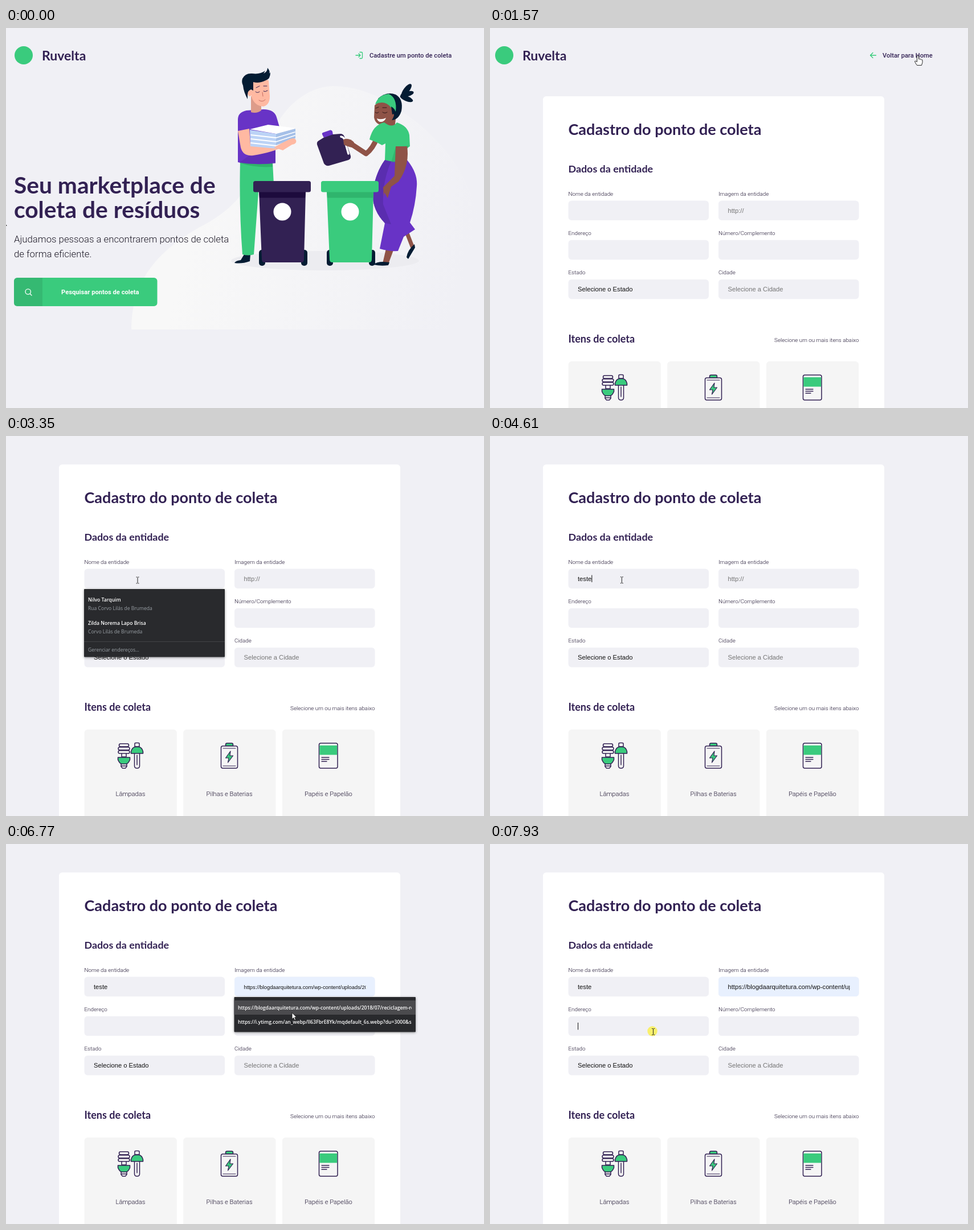
Write an HTML page that moves like this. It is 839x668 px and loops after 8 s.

```html
<!DOCTYPE html>
<html lang="pt-BR">
<head>
<meta charset="utf-8">
<title>Ruvelta</title>
<style>
html, body { margin: 0; width: 100%; height: 100%; overflow: hidden; background: #f0f0f5; }
svg { display: block; }
text { font-family: Roboto, sans-serif; fill: #322153; white-space: pre; }
.h { font-family: Lato, sans-serif; font-weight: 700; }
.nav { font-size: 11.2px; font-weight: 500; }
.lead { font-size: 16.75px; font-weight: 300; fill: #1c1826; }
.label { font-size: 9.8px; font-weight: 300; fill: #1c1230; }
.item { font-size: 11.2px; font-weight: 300; text-anchor: middle; fill: #1c1230; }
.in { font: 11.2px "Liberation Sans", sans-serif; fill: #111; }
.hint { fill: #757575; }
.menu text { font: 600 8.6px "Open Sans", sans-serif; fill: #fff; }
.menu .sub { font-weight: 400; fill: #9aa0a6; }
.menu > rect:first-child { fill: #292a2d; filter: drop-shadow(0 1px 2px #0006); }
.line { fill: none; stroke: #34cb79; stroke-width: 1.3; stroke-linecap: round; stroke-linejoin: round; }
.icon { stroke: #322153; stroke-width: 1.5; stroke-linejoin: round; stroke-linecap: round; fill: #f5f5f5; }
.icon .g, .g { fill: #3acb7d; }
.p { fill: #6833c6; } .d { fill: #322153; } .n { fill: #041c33; }
.skin { fill: #ffb9a2; } .brown { fill: #8f5347; }
.limb { fill: none; stroke-linecap: round; stroke-linejoin: round; }
</style>
</head>
<body>
<svg id="stage" width="839" height="668" viewBox="0 0 839 668">
<defs>
  <linearGradient id="haze" gradientUnits="userSpaceOnUse" x1="330" y1="330" x2="800" y2="450">
    <stop stop-color="#f8f8f8"/><stop offset="1" stop-color="#f0f0f5"/>
  </linearGradient>
  <g id="brand">
    <circle class="g" cx="31" cy="48" r="16"/>
    <text class="h" x="63" y="56.500" font-size="23">Ruvelta</text>
  </g>
  <g id="bin">
    <rect class="n" x="10" y="121" width="11" height="28" rx="5"/>
    <rect class="n" x="84" y="121" width="11" height="28" rx="5"/>
    <path d="M10 18H92L89 138Q89 143 84 143H20Q15 143 15 138Z" fill="currentColor"/>
    <path d="M10 18H92L91 29.500H11Z" fill="var(--shade)"/>
    <rect width="101" height="19.500" rx="3.500" fill="currentColor"/>
    <circle cx="51" cy="54" r="15.500" fill="#fff"/>
  </g>
</defs>

<g id="home">
  <path fill="url(#haze)" d="M220 530C220 450 260 395 340 350C440 300 440 230 475 170C500 125 540 102 575 102C640 104 680 135 720 165C790 220 839 300 839 420V530Z"/>
  <use href="#brand"/>
  <path class="line" d="M614 48H622M619 45L622 48L619 51M621 42.500H624Q625.500 42.500 625.500 44V52Q625.500 53.500 624 53.500H621"/>
  <text class="nav" x="638" y="52">Cadastre um ponto de coleta</text>
  <g font-size="40.7"><text class="h" x="14" y="290.500">Seu marketplace de</text><text class="h" x="14" y="334">coleta de resíduos</text></g>
  <text class="lead" x="14" y="376.500">Ajudamos pessoas a encontrarem pontos de coleta</text>
  <text class="lead" x="14" y="402.500">de forma eficiente.</text>
  <rect class="g" x="14" y="439" width="251.500" height="50" rx="5.600"/>
  <path d="M64 439H19.600Q14 439 14 444.600V483.400Q14 489 19.600 489H64Z" fill="#000" fill-opacity=".09"/>
  <path class="line" style="stroke:#fff" d="M34 463.500a4.700 4.700 0 1 0 9.400 0a4.700 4.700 0 1 0-9.400 0M42 467L45 470"/>
  <text x="97" y="467.500" font-size="11.2" font-weight="700" style="fill:#fff">Pesquisar pontos de coleta</text>

  <ellipse cx="560" cy="409" rx="165" ry="17" fill="#ececf0"/>
  <g id="man">
    <path class="n" d="M418 398H429L428 410Q414 415 401 413Q403 409 412 408Z"/>
    <path class="g" d="M411 236H468L470 275H444L435 398Q425 401 415 398Q409 320 411 236Z"/>
    <path fill="#2fb36b" d="M412 238H468V244Q440 246 412 238Z"/>
    <path class="p" d="M407 161Q407 148 422 145L452 143Q471 143 475 157L480 174L473 177V237Q440 242 407 236Z"/>
    <path fill="#5a2cac" d="M430 222L473 214V238Q440 241 409 237Z" opacity=".6"/>
    <path fill="#dd9c8a" d="M430 120H448V145Q440 151 430 148Z"/>
    <path class="skin" d="M430 96Q446 86 461 92L463 120Q463 135 452 138Q436 137 431 121Z"/>
    <ellipse class="skin" cx="428" cy="114" rx="4" ry="6"/>
    <path class="n" d="M424 125Q417 112 416 101Q413 95 415 89Q420 79 432 80Q446 82 455 75L452 80Q459 77 459 70Q464 76 462 80L464 78Q464 90 456 92Q444 98 434 95L434 110L430 108Q424 110 424 118Z"/>
    <path class="limb" stroke="#322153" d="M438 112Q441 115 445 112M452 111Q455 113 459 110M439 105L445 102M452 102L458 102"/>
    <path class="limb" stroke="#c56d60" d="M444 127Q450 131 455 126M450 113L451 120"/>
    <path class="skin" d="M407 181L427 177L429 205L478 202L488 208Q470 218 434 224Q416 226 412 210Z"/>
    <path fill="#bcd3f6" d="M428 179L474 186V212L429 208Z"/>
    <path fill="#a5c0e8" d="M474 186L508 177V198L474 212Z"/>
    <path fill="#fff" d="M428 178L460 170L508 176L474 186Z"/>
    <path class="limb" stroke="#fff" stroke-width="1.800" d="M430 188L474 193L507 183M430 195L474 200L507 189M430 202L474 207L507 195"/>
    <path class="skin" d="M470 210Q486 201 495 197Q506 191 509 197Q511 204 502 205L486 215Z"/>
  </g>
  <use href="#bin" x="434" y="269" style="color:#322153;--shade:#1d0b3d"/>
  <g id="woman">
    <path class="limb" stroke="#8f5347" stroke-width="7" d="M701 353L713 384"/>
    <path class="n" d="M717 380L718 386L706 406L703 403Q705 390 717 380Z"/>
    <path class="brown" d="M667 388H681L671 415L661 414Z"/>
    <path class="n" d="M645 416Q650 411 662 411L673 412L671 417Q658 419 645 416Z"/>
    <path class="p" d="M665 232H704Q723 255 721 278Q719 312 709 342L718 354L698 367L688 392Q672 393 656 388L665 343Q641 318 644 286Q649 254 665 232Z"/>
    <path fill="#5a2daf" d="M665 232H677Q660 270 662 310L676 345L665 343Q641 318 644 286Q649 254 665 232Z"/>
    <path class="brown" d="M671 160H684L682 178L668 172Z"/>
    <path class="n" d="M653 124Q668 111 684 117Q698 125 694 146Q689 162 676 162Z"/>
    <g class="n">
      <ellipse cx="703" cy="109" rx="5" ry="13" transform="rotate(38 703 109)"/>
      <ellipse cx="704" cy="116" rx="4.500" ry="12" transform="rotate(75 704 116)"/>
      <ellipse cx="703" cy="124" rx="4.500" ry="12" transform="rotate(112 703 124)"/>
    </g>
    <path class="brown" d="M647 136Q662 120 680 133L681 154Q675 171 662 171Q648 170 646 157Z"/>
    <path class="g" d="M648 134Q654 117 672 116Q687 123 684 147L676 140Q665 126 648 134Z"/>
    <path class="n" d="M676 138Q684 142 684 150L678 152Z"/>
    <path class="limb" stroke="#2c1717" d="M648 148Q651 151 654 148M661 148Q665 151 669 148M649 141L654 139M661 140L668 140"/>
    <path fill="#fff" d="M651 159Q659 162 667 158Q664 166 656 165Q652 163 651 159Z"/>
    <path class="limb" stroke="#8f5347" stroke-width="9" d="M651 193Q644 212 632 221L606 204"/>
    <path class="g" d="M664 166Q678 177 686 166Q705 172 708 188L709 208L704 211V232Q684 238 665 232L666 203L660 206Q650 200 638 196Q644 170 664 166Z"/>
    <path fill="#2aa661" d="M684 209L706 207V210L689 236H676Z" opacity=".5"/>
    <path class="brown" d="M684 208L704 208Q709 242 689 270L676 279L670 299L664 289L663 297L662 280L682 260Z"/>
  </g>
  <path class="p" d="M556 184L569 179.500Q572 179 573 182L574 188L558 193L555 187Q554 185 556 184Z"/>
  <path class="d" d="M557 193L574 187L587 186Q592 186 594 191L605 225Q606 230 601 232L567 242Q561 243 558 238L546 205Q545 200 549 198Z"/>
  <path class="limb" stroke="#fff" stroke-width="3.500" d="M588 191Q593 192 594 196L601 221"/>
  <path class="brown" d="M592 196Q602 192 611 201L607 210Q598 208 593 205Z"/>
  <use href="#bin" x="553" y="269" style="color:#3acb7d;--shade:#2fb56d"/>
</g>

<g id="form">
  <use href="#brand" x="-6"/>
  <path class="line" d="M677.500 48H667.500M672 43.500L667.500 48L672 52.500"/>
  <text class="nav" x="689" y="52">Voltar para Home</text>
  <rect x="93" y="120" width="599" height="900" rx="5.600" fill="#fff"/>
  <text class="h" x="137.500" y="188" font-size="27">Cadastro do ponto de coleta</text>
  <text class="h" x="137.500" y="253.500" font-size="17.9">Dados da entidade</text>
  <g id="fields"></g>
  <text class="h" x="137.500" y="553" font-size="18">Itens de coleta</text>
  <text class="label" x="647.500" y="551.500" text-anchor="end">Selecione um ou mais itens abaixo</text>
  <g id="items"></g>
  <g class="icon">
    <path d="M203 627V634H211V627"/>
    <rect x="198.500" y="611" width="17" height="5" rx="2.500"/><rect x="197" y="617" width="20" height="5" rx="2.500"/><rect x="197" y="623" width="20" height="5" rx="2.500"/>
    <path d="M202 645V651L204.500 654H209.500L212 651V645M203 650H211"/>
    <path class="g" d="M196.500 635H217.500V639Q215 645.500 211 646.500H203Q199 645.500 196.500 639Z"/>
    <path d="M225.500 627V650Q225.500 654 230 654Q234.500 654 234.500 650V627M230 631V648M226 616V611Q226 609.500 228 609.500H232Q234 609.500 234 611V616Z"/>
    <path class="g" d="M219.500 628V625Q221 617.500 227 616.500H233Q239 617.500 240.500 625V628Z"/>
    <path class="g" d="M385.500 615V612.500Q385.500 610 388 610H396Q398.500 610 398.500 612.500V615Z"/>
    <rect x="377.500" y="615" width="29" height="39" rx="3"/><path d="M381 619H403M381 650H403" stroke-width="1"/>
    <path class="g" d="M394 624L385.500 636H391L389.500 644L398.500 632H393Z" stroke-width="1.200"/>
    <rect x="549.500" y="610" width="32.500" height="44" rx="3"/>
    <path class="g" d="M550.300 614H581.200V630.500H550.300Z" stroke="none"/>
    <path d="M554 635H567M554 638.500H567M554 642H563" stroke-width="1.300"/>
  </g>
</g>

<g id="entry">
  <rect id="filled" x="401" y="233.500" width="246.500" height="34.500" rx="5.600" fill="#e8f0fe"/>
  <text id="typed" class="in" x="154" y="254.500"></text>
  <svg x="410" y="234" width="221.500" height="34"><text id="address" class="in" x="7.500" y="20.500">https://blogdaarquitetura.com/wp-content/uploads/2018/07/reciclagem-re</text></svg>
  <rect id="caret" width="1" height="12.500" fill="#111"/>
</g>

<g id="people" class="menu">
  <rect x="137" y="269" width="247" height="119.500" rx="1"/>
  <path d="M137 361.500H384" stroke="#434447"/>
  <text x="144" y="290.500">Nilvo Tarquim</text>
  <text class="sub" x="144" y="305.500">Rua Corvo Lilás de Brumeda</text>
  <text x="144" y="331.500">Zilda Norema Lapo Brisa</text>
  <text class="sub" x="144" y="346.500">Corvo Lilás de Brumeda</text>
  <text class="sub" x="144" y="379">Gerenciar endereços…</text>
</g>
<g id="links" class="menu">
  <rect x="400.500" y="269" width="318.500" height="61.500" rx="1"/>
  <rect id="hover" x="400.500" width="318.500" height="25" fill="#4b4b4e"/>
  <svg x="400" y="269" width="312" height="62">
    <text id="video" x="7">https://i.ytimg.com/an_webp/ll63FbrE8Yk/mqdefault_6s.webp?du=3000&amp;sq</text>
    <text id="blog" x="7">https://blogdaarquitetura.com/wp-content/uploads/2018/07/reciclagem-re</text>
  </svg>
</g>

<g id="cursor">
  <circle id="press" cx="-1.500" cy="-1" r="8.700" fill="#fbf04a" fill-opacity=".8"/>
  <path id="arrow" d="M0 0V11.500L2.700 9L4.600 13.200L6.600 12.300L4.700 8.300H8.200Z" fill="#fff" stroke="#111" stroke-width=".9"/>
  <path id="hand" d="M-1.500 1Q0-1 1.500 1V6Q3 4.800 4 6.500Q5.500 5.500 6.500 7.200Q8 6.500 8 8.500V12L6.500 17H-1.500Q-4.500 13-5.500 10Q-4.500 8-1.500 11Z" fill="#fff" stroke="#111" stroke-width=".9"/>
  <path id="beam" d="M-2.500-5.500H-.6M.6-5.500H2.500M0-5V5M-2.500 5.500H-.6M.6 5.500H2.500" fill="none" stroke="#222"/>
</g>
</svg>

<script>
const LOOP = 8000;
const $ = id => document.getElementById(id);
const show = (id, on) => $(id).style.display = on ? '' : 'none';
const within = (t, ...spans) => spans.some(([from, to]) => t >= from && t < to);

const fields = [
  ['Nome da entidade'], ['Imagem da entidade', 'http://', 'hint'],
  ['Endereço'], ['Número/Complemento'],
  ['Estado', 'Selecione o Estado', ''], ['Cidade', 'Selecione a Cidade', 'hint']
];
$('fields').innerHTML = fields.map(([label, value = '', style = ''], i) => {
  const x = 137.5 + i % 2 * 263.5, y = 303.5 + (i >> 1) * 69.2;
  return `<text class="label" x="${x}" y="${y - 9}">${label}</text>
    <rect x="${x}" y="${y}" width="246.5" height="34.5" rx="5.6" fill="#f0f0f5"/>
    <text class="in ${style}" x="${x + 16.5}" y="${y + 21}">${value}</text>`;
}).join('');
$('items').innerHTML = ['Lâmpadas', 'Pilhas e Baterias', 'Papéis e Papelão'].map((name, i) => {
  const x = 137.5 + i * 173.7;
  return `<rect x="${x}" y="586" width="162.3" height="200" rx="5.6" fill="#f5f5f5"/>
    <text class="item" x="${x + 81}" y="703">${name}</text>`;
}).join('');
const hint = document.querySelector('#fields .hint');

// time, x, y, pointer shape from here on
const path = [
  [0, -7, 339, 'arrow'], [70, -4, 340], [200, 120, 375], [350, 400, 330], [530, 700, 160],
  [680, 812, 75], [790, 780, 46, 'hand'], [900, 760, 47], [1000, 751, 48], [1970, 751, 49],
  [2050, 700, 85, 'arrow'], [2350, 350, 240], [2500, 255, 278], [2600, 237, 276],
  [2680, 232, 262, 'beam'], [2810, 231, 253.5], [4610, 231, 253.5], [4700, 260, 230, 'arrow'],
  [4850, 330, 218], [5000, 430, 225], [5100, 490, 243, 'beam'], [5200, 504.5, 246],
  [6630, 504.5, 246], [6690, 503, 304, 'arrow'], [6770, 502, 296.5], [6910, 502, 294],
  [7240, 502, 292], [7330, 545, 284], [7450, 569, 270], [7650, 569, 270],
  [7760, 420, 285, 'beam'], [7870, 292, 327], [7930, 286.5, 330], [LOOP, 286.5, 330]
];
const scrolling = [[0, 0], [2350, 0], [2470, 20], [2600, 54], [2740, 70], [LOOP, 70]];

function sample(keys, t) {
  const i = keys.findIndex(k => k[0] > t), a = keys[i - 1], b = keys[i];
  const u = (t - a[0]) / (b[0] - a[0]);
  return a.slice(1, 3).map((v, n) => v + (b[n + 1] - v) * u);
}

function draw(t) {
  const onForm = t >= 1570;
  show('home', !onForm);
  show('form', onForm);
  show('entry', onForm);
  $('form').setAttribute('transform', `translate(0 ${-sample(scrolling, t)[0]})`);

  const letters = [3680, 3750, 3950, 4080, 4280].filter(at => t >= at).length;
  $('typed').textContent = 'teste'.slice(0, letters);

  show('people', within(t, [2880, 3680]));
  show('links', within(t, [5290, 7310]));
  const swapped = t >= 6300;
  $('video').setAttribute('y', swapped ? 47 : 21.5);
  $('blog').setAttribute('y', swapped ? 21.5 : 47);

  const [x, y] = sample(path, t);
  show('hover', within(t, [6660, 7310]) && y > 272);
  $('hover').setAttribute('y', y > 300 ? 300 : 275);

  const hasAddress = t >= 6690;
  show('filled', hasAddress);
  show('address', hasAddress);
  hint.style.display = hasAddress ? 'none' : '';
  $('address').style.fontSize = t < 7310 ? '9.33px' : '';

  show('caret', within(t, [2880, 3350], [3680, 4780], [5290, 5830], [6230, 6630], [7870, LOOP]));
  const advance = [0, 3.1, 9.3, 14.9, 18, 24.3][letters];
  const [caretX, caretY] = t < 5290 ? [154 + advance, 244.5] : t < 7800 ? [417.5, 244.5] : [154, 314];
  $('caret').setAttribute('x', caretX);
  $('caret').setAttribute('y', caretY);

  const shape = path.filter(k => k[0] <= t && k[3]).pop()[3];
  for (const id of ['arrow', 'hand', 'beam']) show(id, id === shape);
  show('press', within(t, [1100, 1310], [2810, 3020], [5220, 5430], [7170, 7310], [7860, LOOP]));
  $('cursor').setAttribute('transform', `translate(${x} ${y})`);
}

function frame() {
  draw(performance.now() % LOOP);
  requestAnimationFrame(frame);
}
frame();
</script>
</body>
</html>
```
